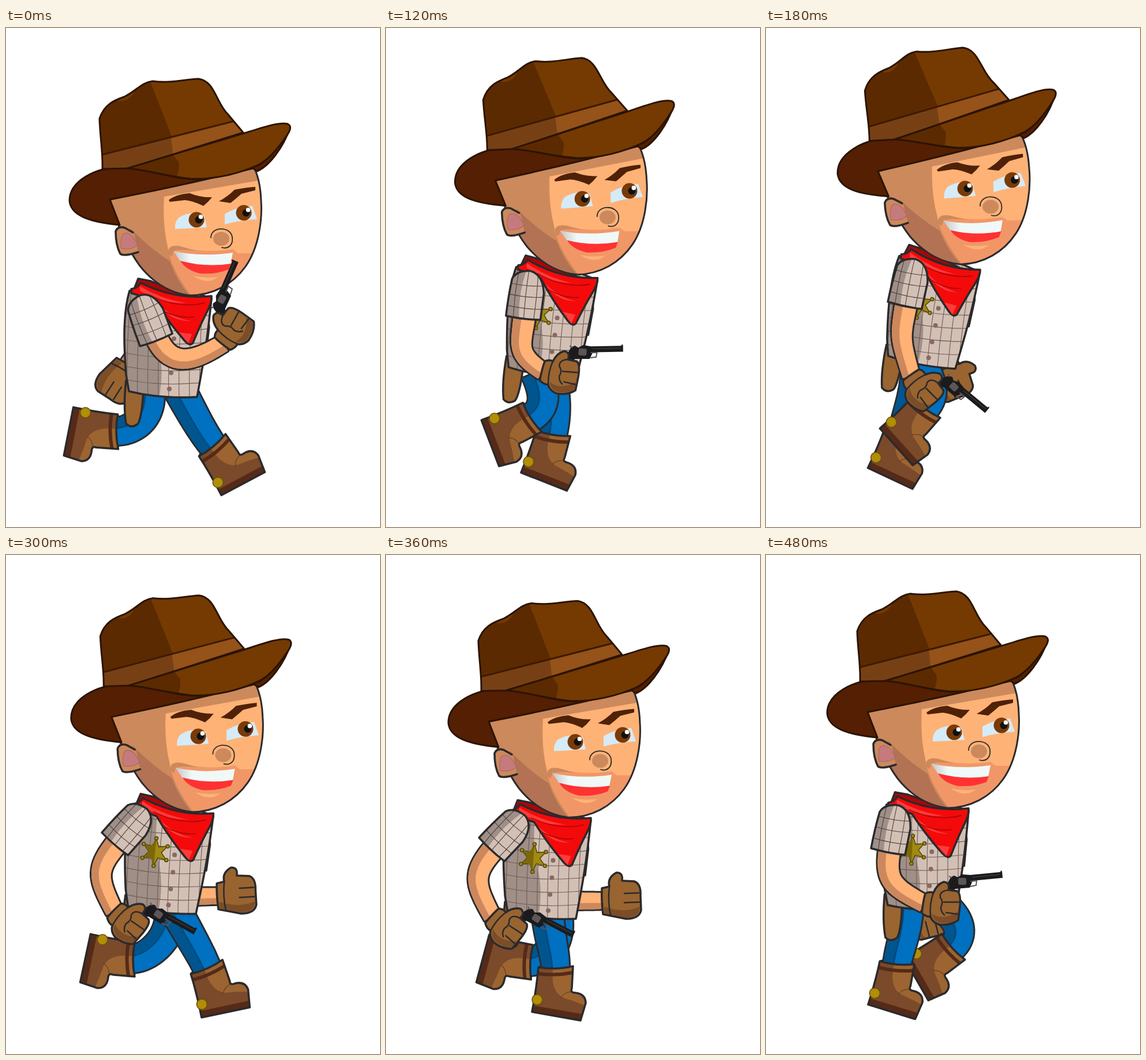
Animation, 648 px wide and 864 px high, one loop 0.54 s. Source, as an HTML page:

```html
<!DOCTYPE html>
<html lang="en">
<head>
<meta charset="utf-8">
<title>Running cowboy</title>
<style>
html, body { margin: 0; width: 100%; height: 100%; overflow: hidden; background: #fff; }
svg { display: block; width: 100vw; height: 100vh; }
.o { stroke: #2a2a2c; stroke-width: 3.5; stroke-linejoin: round; stroke-linecap: round; }
.l { fill: none; stroke: #2a2a2c; stroke-width: 2.5; stroke-linecap: round; }
.h { stroke: #2b1404; stroke-width: 3; stroke-linejoin: round; }
.p { fill: none; stroke: #6f5b56; stroke-width: 1.1; }
</style>
</head>
<body>
<svg viewBox="0 0 648 864">
<defs>
  <clipPath id="shirtClip"><path id="shirtPath" d="M214 455C201 500 205 560 208 600L213 629Q265 642 331 639C340 590 348 550 356 468L300 450Z"/></clipPath>
  <clipPath id="faceClip"><path id="facePath" d="M180 297C194 345 212 385 232 412C255 441 285 459 318 463C358 463 393 444 415 413C439 379 444 330 442 300Q441 262 428 238Z"/></clipPath>
  <clipPath id="crownClip"><path id="crownPath" d="M167 244C168 215 163 190 162 157C170 132 188 125 205 119C226 109 235 94 254 92C285 96 308 89 334 88C362 92 364 130 385 150L411 181L212 243Z"/></clipPath>
  <clipPath id="brimClip"><path id="brimPath" d="M210 243L380 192C430 178 470 161 488 166Q497 170 488 184C474 205 455 228 437 237C405 252 360 263 320 261C278 257 242 245 210 243Z"/></clipPath>
  <clipPath id="sleeveClip"><path id="sleevePath" d="M-30 -5Q-23 -20 0 -21Q23 -17 27 16L25 62Q-5 64 -35 60Q-34 25 -30 -5Z"/></clipPath>
  <linearGradient id="teeth"><stop offset="0" stop-color="#c3c6c8"/><stop offset=".28" stop-color="#f0f9f8"/></linearGradient>

  <g id="boot">
    <path fill="#9c6430" d="M-30 0Q0 5 30 -2L28 36Q25 44 34 44Q52 46 52 62L43 92L-41 77Q-33 35 -30 0Z"/>
    <path fill="#7a4a2a" d="M-30 2L-5 4Q-9 42 14 53Q32 58 51 66L43 92L-41 77Z"/>
    <path fill="#552a18" d="M-39 66L47 81L43 92L-41 77ZM-29 8Q0 12 29 6V12Q0 18 -30 14Z"/>
    <path fill="none" stroke="#5c3820" d="M28 42Q14 43 9 53"/>
    <path class="o" fill="none" d="M-30 0Q0 5 30 -2L28 36Q25 44 34 44Q52 46 52 62L43 92L-41 77Q-33 35 -30 0Z"/>
    <circle cx="-32" cy="56" r="9" fill="#b08e06" stroke="#6b4f0a" stroke-width="1.5"/>
  </g>

  <g id="sleeve">
    <use href="#sleevePath" fill="#d3c0b5"/>
    <g clip-path="url(#sleeveClip)">
      <path fill="#9f8f87" d="M-40 -30H-4Q-18 15 -12 66H-40Z"/>
      <path class="p" style="stroke:#4a4040" d="M-19 -22Q-24 20 -22 66M-2 -22Q-5 20 -4 66M14 -22Q16 20 13 66M-40 2Q0 8 30 2M-40 21Q0 27 30 22M-40 41Q0 47 30 43"/>
    </g>
    <use href="#sleevePath" class="o" fill="none"/>
  </g>

  <g id="gun">
    <path fill="#1b1b1d" d="M-20 -8L-14 -11L-8 -8L0 -13L14 -12L66 -17L67 -20L69 -18L70 -7L18 -2L13 10L-12 12L-24 24L-32 16Z"/>
    <path fill="none" stroke="#55555a" stroke-width="2" d="M14 -1L25 -2L24 6L14 8M-18 -7L-23 -10"/>
    <rect x="-7" y="-7" width="14" height="12" rx="3" fill="#5e5656"/>
    <path stroke="#3b3b3e" stroke-width="1.5" d="M17 -8L66 -13"/>
  </g>

  <g id="fist">
    <path class="o" fill="#996430" d="M-70 54Q-68 34 -64 20Q-56 16 -50 19Q-44 4 -32 0Q-21 1 -24 14L-9 16Q-2 20 -4 42L-7 66Q-20 76 -40 74Q-52 70 -55 60Q-62 61 -70 54Z"/>
    <path fill="#7b4d28" d="M-53 55Q-32 69 -6 50L-9 66Q-22 73 -40 71Q-50 67 -53 55Z"/>
    <path class="l" d="M-50 19Q-57 38 -55 59M-32 35H-6M-28 53L-8 56M-24 14Q-40 16 -38 27Q-32 34 -37 44Q-37 52 -31 57"/>
  </g>

  <g id="farFist">
    <path class="o" fill="#996430" d="M-37 -20L-24 -23Q-28 -38 -12 -47Q0 -48 -2 -33L19 -32Q31 -28 30 -7L31 18Q28 33 5 33L-20 28L-35 25Q-38 0 -37 -20Z"/>
    <path fill="#7b4d28" d="M-33 12Q2 24 29 12Q28 31 5 31L-33 23Z"/>
    <path class="l" d="M-24 -23Q-27 3 -22 27M2 -11L27 -12M2 5L28 4"/>
  </g>
</defs>

<rect width="648" height="864" fill="#fff"/>
<g id="farArm"></g>
<use href="#farFist" id="farHand"/>
<g id="farLeg"></g>
<g id="nearLeg"></g>

<g id="torso">
  <use href="#sleeve" transform="translate(326 500) rotate(4)"/>
  <path class="o" fill="#9a6530" d="M208 610L238 625C237 655 233 680 228 686Q217 694 208 685Q203 655 208 610Z"/>
  <use href="#shirtPath" fill="#d3c0b5"/>
  <g clip-path="url(#shirtClip)">
    <path fill="#9f8f87" d="M190 440H262Q252 510 266 560Q274 600 264 645H190Z"/>
    <g id="plaid"></g>
    <g fill="#8a6863"><circle cx="291" cy="538" r="4"/><circle cx="289" cy="568" r="4"/><circle cx="286" cy="597" r="4"/><circle cx="283" cy="625" r="4"/></g>
  </g>
  <use href="#shirtPath" class="o" fill="none"/>
  <g id="badge" transform="translate(257 534) rotate(4)"></g>
  <path class="o" fill="#a80808" d="M229 434L250 438L330 468L354 465L340 480L222 452Z"/>
  <path class="o" fill="#f40a0a" d="M217 452Q229 450 233 441Q292 471 356 464Q357 475 349 490Q337 513 324 545Q319 552 309 541Q279 506 258 472Q238 465 217 459Z"/>
  <path fill="#ff3b3b" d="M232 447Q270 470 312 476Q270 478 232 455ZM266 480Q292 504 321 507Q292 509 270 486ZM300 527L322 530L316 546Z"/>
  <path fill="none" stroke="#9b0808" stroke-width="1.4" d="M252 464Q300 487 344 476M270 489Q300 504 326 500"/>
</g>

<g id="head">
  <use href="#facePath" fill="#ffb276"/>
  <g clip-path="url(#faceClip)">
    <path fill="#f19767" d="M281 384Q284 374 303 378Q340 391 393 383L402 390L432 390L420 470H270Z"/>
    <path fill="#cc895c" d="M170 280L435 225L450 262L274 292Q271 340 280 378Q285 420 330 475L170 430Z"/>
    <path fill="#b37254" d="M217 348Q250 382 284 404Q296 440 324 470H190V370Z"/>
    <path fill="#ffb276" d="M324 429Q345 434 368 431Q349 446 324 429Z"/>
    <path fill="#cc895c" d="M281 390Q281 374 302 378L330 386Q302 382 291 386L287 396Z"/>
  </g>
  <use href="#facePath" class="o" fill="none" style="stroke-width:3"/>
  <path fill="#cc895c" d="M229 388Q205 396 198 391Q190 376 190 352Q194 342 206 346L222 355Z"/>
  <path fill="#c57b7d" stroke="#a8635f" d="M202 357Q211 351 221 363L228 375Q219 385 200 382Q197 369 202 357Z"/>
  <path class="o" fill="none" d="M229 388Q205 396 198 391Q190 376 190 352Q194 342 206 346L220 354"/>
  <g fill="#4f2108">
    <path d="M282 298Q294 288 318 286Q338 294 357 293Q350 302 342 308Q323 299 310 298L284 301Z"/>
    <path d="M369 300Q384 292 396 280Q416 276 432 275L432 281L408 287Q399 295 389 303Z"/>
  </g>
  <g fill="#d5ebf7">
    <path d="M293 348Q292 335 300 328Q320 316 343 324L348 345Q320 347 293 348Z"/>
    <path d="M379 340V322Q399 310 427 308L435 331Q405 333 379 340Z"/>
  </g>
  <g id="eyes"></g>
  <ellipse cx="373" cy="365" rx="14" ry="12" fill="#cc895c"/>
  <path class="l" style="stroke-width:1.8" d="M355 363C355 343 389 343 392 362C394 377 384 383 374 380"/>
  <path fill="url(#teeth)" d="M290 386Q338 397 393 389L389 409Q345 415 303 405Z"/>
  <path fill="#ff3232" d="M302 403Q345 415 390 408L386 418Q363 427 336 425Q311 419 302 403Z"/>

  <path class="h" fill="#541f02" d="M110 299C110 265 155 241 200 241C250 244 290 262 330 262L437 238C462 222 480 195 492 173C480 208 455 240 435 248L428 243Q300 274 180 297L197 341C145 336 112 325 110 299Z"/>
  <use href="#crownPath" fill="#743a02"/>
  <g clip-path="url(#crownClip)">
    <path fill="#5c2a00" d="M150 80H245L292 200L285 250H150Z"/>
    <path fill="#743a02" d="M193 126Q213 130 224 107L205 117Z"/>
    <path fill="#955219" d="M160 221L396 161L420 185L200 255H160Z"/>
    <path fill="#774014" d="M160 221L286 189L290 225L200 255H160Z"/>
    <path fill="none" stroke="#3d1a02" stroke-width="3" d="M160 221L396 161"/>
  </g>
  <use href="#crownPath" class="h" fill="none"/>
  <use href="#brimPath" fill="#743a02"/>
  <path clip-path="url(#brimClip)" fill="#5c2a00" d="M190 230L287 210Q291 225 299 231Q302 243 294 264H190Z"/>
  <use href="#brimPath" class="h" fill="none"/>
</g>

<g id="nearArm"></g>
<use href="#sleeve" id="nearSleeve"/>
<g id="hand"><use href="#gun"/><use href="#fist"/></g>
</svg>
<script>
const STEP = 60, STEPS = 9;
const $ = id => document.getElementById(id);

// One row per step; 0 marks a step halfway between its neighbours.
const head = [[0, 0, 0], [5, -18, -.6], 0, [14, -53, -1.9], [7.5, -27, -1.1], 0, [-2, -8.5, 0], 0, [-4, -25, 0]];
const torso = [[0, 0, 0], [0, -18, 2], 0, [-3, -49, 6], [-2, -26, 3.2], 0, [-2, -9, .3], 0, [-2, -25, -1]];
const sleeve = [[241, 482, -23], [240, 462, 0], 0, [256, 421, 10], [235, 445, 37], 0, [227, 467, 41], 0, [226, 454, 9]];
const gun = [[375, 470, -61], [356, 502, -36], 0, [325, 622, 45], [267, 616, 36], 0, [260, 630, 33], 0, [340, 566, 0]];
const farHand = [[192, 614, 125], [250, 580, 105], 0, [322, 612, 70], [394, 579, -2], 0, [411, 597, 0], 0, [281, 632, 78]];
// hip x, boot x, boot y, boot turn, thigh angle
const nearLeg = [[247, 193, 699, 91, 5], [255, 228, 691, 80, 15], 0, [268, 277, 658, 38, 30], [285, 304, 680, 19, 25],
  [293, 348, 714, -22, 28], [280, 294, 714, 0, 5], 0, [245, 227, 707, 7, 0]];
const farLeg = [[303, 358, 723, -38, 28], [302, 343, 707, 8, 35], 0, [262, 236, 698, 15, 0], [272, 241, 701, 68, 10],
  [285, 222, 700, 92, 8], [294, 252, 705, 95, 15], 0, [302, 324, 679, 50, 55]];

function pose(track, i) {
  if (track[i]) return track[i];
  const a = track[i - 1], b = track[i + 1];
  return a.map((v, k) => (v + b[k]) / 2);
}

function polar(deg, len) {
  const a = deg * Math.PI / 180;
  return [Math.cos(a) * len, Math.sin(a) * len];
}
const add = (p, q, k = 1) => [p[0] + q[0] * k, p[1] + q[1] * k];

function local([x, y, deg], px, py) {
  const [c, s] = polar(deg, 1);
  return [x + px * c - py * s, y + px * s + py * c];
}

const place = ([x, y, deg]) => `translate(${x} ${y}) rotate(${deg})`;

// Outline of a tapering strip along a cubic; from and to run from -1 to 1 across it.
function strip(c, w0, w1, from, to) {
  const left = [], right = [], n = 20;
  for (let i = 0; i <= n; i++) {
    const t = i / n, u = 1 - t;
    const at = k => u * u * u * c[0][k] + 3 * u * u * t * c[1][k] + 3 * u * t * t * c[2][k] + t * t * t * c[3][k];
    const d = k => u * u * (c[1][k] - c[0][k]) + 2 * u * t * (c[2][k] - c[1][k]) + t * t * (c[3][k] - c[2][k]);
    const dx = d(0), dy = d(1), w = (w0 + (w1 - w0) * t) / (Math.hypot(dx, dy) || 1);
    const p = [at(0), at(1)], side = [dy * w, -dx * w];
    left.push(add(p, side, from));
    right.unshift(add(p, side, to));
  }
  return 'M' + left.concat(right).map(q => q[0].toFixed(1) + ' ' + q[1].toFixed(1)).join('L') + 'Z';
}

function limb(curve, w0, w1, light, dark) {
  const full = strip(curve, w0, w1, -1, 1);
  return `<path d="${full}" fill="none" stroke="#2a2a2c" stroke-width="6" stroke-linejoin="round"/>` +
    `<path d="${full}" fill="${light}"/><path d="${strip(curve, w0, w1, -1, -.25)}" fill="${dark}"/>`;
}

function leg(row, hipY) {
  const [hx, x, y, turn, thigh] = row, boot = [x, y, turn];
  const hip = [hx, hipY], axis = polar(turn + 90, 1);
  const curve = [hip, add(hip, polar(90 - thigh, 48)), add([x, y], axis, -25), add([x, y], axis, 7)];
  return `<ellipse rx="31" ry="6" fill="#1d1d1f" transform="${place(boot)}"/>` +
    limb(curve, 27, 23, '#0070c0', '#00558f') +
    `<path d="${strip(curve, 27, 23, -.28, -.22)}" fill="none" stroke="#00406c"/>` +
    `<use href="#boot" transform="${place(boot)}"/>`;
}

function nearArm(s, g) {
  const start = local(s, -3, 50), end = local(g, -66, 38);
  const k = Math.min(70, .46 * Math.hypot(end[0] - start[0], end[1] - start[1]) + 10);
  const curve = [start, add(start, polar(s[2] + 91, k)), add(end, polar(g[2] + 29, -k)), end];
  return limb(curve, 19, 15, '#ffb176', '#cc885c');
}

function farArm(h) {
  const p = k => local(h, k, 2);
  return limb([p(-85), p(-70), p(-50), p(-30)], 15, 14, '#ffb176', '#cc885c');
}

function draw(i) {
  const at = track => pose(track, i);
  const h = at(head), t = at(torso), s = at(sleeve), g = at(gun), f = at(farHand);
  $('head').setAttribute('transform', `translate(${h[0]} ${h[1]}) rotate(${h[2]} 300 300)`);
  $('torso').setAttribute('transform', `translate(${t[0]} ${t[1]}) rotate(${t[2]} 331 639)`);
  $('nearSleeve').setAttribute('transform', place(s));
  $('hand').setAttribute('transform', place(g));
  $('farHand').setAttribute('transform', place(f));
  $('nearArm').innerHTML = nearArm(s, g);
  $('farArm').innerHTML = farArm(f);
  $('nearLeg').innerHTML = leg(at(nearLeg), 630 + t[1]);
  $('farLeg').innerHTML = leg(at(farLeg), 630 + t[1]);
}

function decorate() {
  let d = '';
  for (let i = 0; i < 9; i++) {
    const x = 212 + i * 18;
    d += `M${x + 6} 445Q${x - 4} 540 ${x - 2} 645`;
  }
  for (let i = 0; i < 8; i++) {
    const y = 468 + i * 23;
    d += `M195 ${y}Q270 ${y + 18} 365 ${y + 5}`;
  }
  $('plaid').innerHTML = `<path class="p" d="${d}"/>`;

  const star = [], balls = [];
  for (let i = 0; i < 12; i++) {
    const p = polar(i * 30 - 90, i % 2 ? 11 : 24);
    star.push(p);
    if (i % 2 === 0) balls.push(`<circle cx="${p[0]}" cy="${p[1]}" r="3"/>`);
  }
  $('badge').innerHTML = `<g fill="#a08a12" stroke="#54460c" stroke-width="1.5"><path d="M${star.join('L')}Z"/>${balls.join('')}</g>` +
    '<path fill="#7c6808" d="M0 -20L-10 -9L-18 -10L-11 0L-18 11L-8 10L0 20Z"/>';

  const eye = (x, y) => `<circle cx="${x}" cy="${y}" r="13.5" fill="#7a3a08"/>` +
    `<circle cx="${x + 4}" cy="${y}" r="6.5" fill="#0d1215"/><circle cx="${x + 7.5}" cy="${y - 5}" r="3.8" fill="#fff"/>`;
  $('eyes').innerHTML = eye(330, 332) + eye(412, 320);
}

let shown = -1;
function tick(now) {
  const i = Math.floor(now / STEP) % STEPS;
  if (i !== shown) draw(shown = i);
  requestAnimationFrame(tick);
}

decorate();
draw(0);
const begin = performance.now();
requestAnimationFrame(function run() {
  tick(Math.max(0, performance.now() - begin));
});
tick = (inner => () => inner(Math.max(0, performance.now() - begin)))(tick);
</script>
</body>
</html>
```
